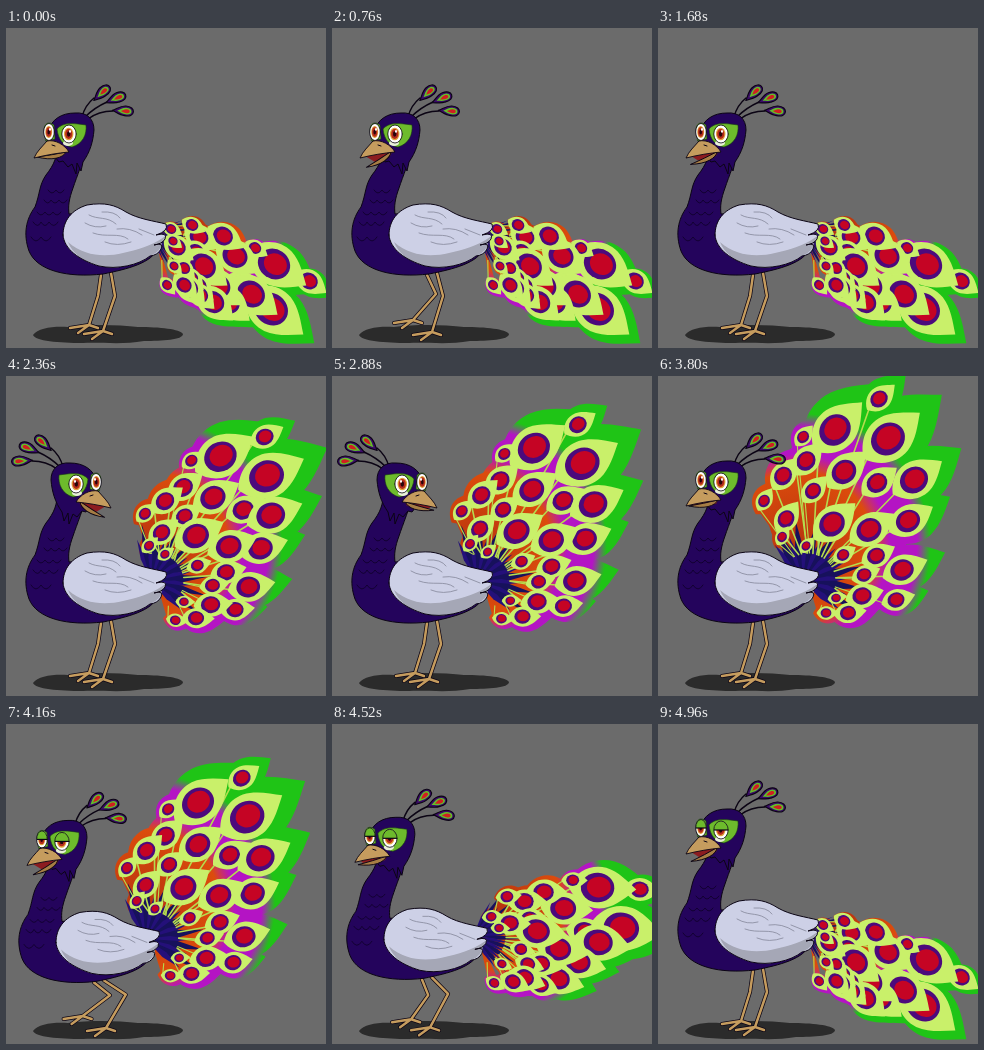
An HTML page with a canvas for the animation above (5 s loop, 320 by 320 pixels).

```html
<!DOCTYPE html>
<html lang="en">
<head>
<meta charset="utf-8">
<title>Peacock</title>
<style>
html, body { margin: 0; width: 100%; height: 100%; overflow: hidden; background: #6b6b6b; }
canvas { display: block; width: 320px; height: 320px; }
</style>
</head>
<body>
<canvas id="stage"></canvas>
<script>
const canvas = document.getElementById('stage');
const ctx = canvas.getContext('2d');
const dpr = window.devicePixelRatio || 1;
canvas.width = canvas.height = 320 * dpr;

const LOOP = 5000, STEP = 40, RAD = Math.PI / 180;
const INK = '#0b0414', PLUM = '#24045c', TAN = '#c59c5e', MASK = '#6dbb2c';
const PIVOT = [150, 205];

// Keys are time, value pairs, eased between neighbours
const motion = {
  fold: [0, 1, 1720, 1, 2600, 0, 2900, .12, 3240, 0, 3980, 0, 4920, 1, 5000, 1],
  lean: [0, 0, 280, .4, 580, 0, 3800, 0, 4260, 1, 4900, 0, 5000, 0],
  lift: [0, 0, 360, .2, 760, 1, 1120, 0, 3800, 0, 4160, 1, 4760, 0, 5000, 0],
  beak: [0, 0, 340, .7, 540, .25, 760, 1, 1200, .3, 1680, .7, 2000, .2, 2360, 1,
         2860, .3, 3360, 0, 3860, .1, 4160, 1, 4560, .3, 4960, .8, 5000, 0],
  lid:  [0, 0, 3900, 0, 4160, .5, 4960, .5, 5000, 0]
};

// Open x, y, eye radius, folded x, y
const feathers = [
  [221, 23, 8.5, 303, 253], [230, 63, 16.5, 265, 281], [177, 54, 15.5, 268, 236],
  [145, 61, 6, 249, 220], [219, 107, 10, 238, 258], [256, 104, 13.5, 245, 266],
  [186, 96, 12, 229, 228], [148, 85, 9.5, 217, 208], [250, 145, 11.5, 222, 274],
  [211, 154, 12, 212, 258], [125, 100, 9, 193, 209], [155, 115, 8, 190, 224],
  [174, 148, 12.5, 197, 238], [244, 194, 11, 207, 274], [106, 125, 6, 186, 197],
  [128, 143, 8.5, 171, 219], [218, 180, 8.5, 192, 258], [238, 224, 8, 194, 267],
  [206, 199, 7, 185, 250], [204, 220, 9, 183, 260], [185, 179, 6, 178, 240],
  [124, 161, 5, 165, 201], [190, 237, 7.5, 178, 257], [168, 237, 5, 161, 257],
  [148, 170, 4.5, 167, 213], [178, 222, 4.5, 168, 238]
];

const shape = d => new Path2D(d);
const leaf = shape('M-1.9 0C-1.4-1-.5-1.5.5-1.3C1.3-1.1 1.9-.5 2.5 0C1.9.5 1.3 1.1.5 1.3C-.5 1.5-1.4 1-1.9 0Z');
const body = shape('M83 112C77 134 71 148 67 160C63 171 62 178 63 186L104 184L152 220C146 235 122 241 97 246C62 250 31 243 23 223C17 206 20 191 29 179C34 166 33 157 40 147C48 137 52 128 51 115Z');
const wing = shape('M57 207C57 193 65 182 81 177C99 174 109 177 120 184C132 191 148 193 160 196Q163 203 150 207Q162 204 159 211Q156 216 148 217Q158 214 155 221Q152 227 144 228C133 237 111 242 93 238C73 232 58 221 57 207Z');
const wingShade = shape('M62 214C79 229 100 229 117 225C131 222 145 218 158 209Q161 207 156 214Q156 223 144 228C133 237 111 242 93 238C77 234 66 225 62 214Z');
const wingLines = shape('M83 187C92 192 101 188 110 196M96 184Q109 183 114 190M87 205C100 210 113 204 122 211M111 201Q124 199 136 207M79 195Q89 201 100 198M99 214Q111 219 125 214M133 201L148 207');
const scales = shape('M27 194q5 7 8 0q4 7 8 0q5 7 9 0M25 209q5 8 10 0q5 8 10 0M38 172q4 6 7 0q4 6 8 0q4 6 8 0M42 162q4 6 8 0q4 6 8 0M31 184q4 6 8 0q4 6 8 0q4 6 8 0');
const skull = shape('M42 104C45 91 56 85 69 85C81 84 88 91 88 102C87 114 84 124 77 134L75 143L71 135L70 146L66 136L62 139L57 133L53 134C47 127 42 116 42 104Z');
const mask = shape('M51 101C57 94 66 95 80 97C81 106 77 116 66 119C58 118 52 112 51 101ZM38 102C38 95 43 93 48 97L49 111L40 113Z');
const upperBeak = shape('M41 113C49 111 59 117 63 124C52 125 40 127 28 130C31 123 36 119 41 113Z');
const lowerBeak = shape('M31 129Q46 127 60 124C57 130 46 133 31 129Z');
const drop = shape('M-11 0C-6-2-2-6 4-6C10-6 13-3 13 0C13 4 9 6 3 5C-2 5-6 2-11 0Z');
const shadow = shape('M27 307C32 300 47 298 62 299C86 296 113 297 132 299C154 299 174 301 177 306C177 312 156 313 138 313C116 317 95 314 77 315C53 315 29 313 27 307Z');

const mix = (a, b, k) => a + (b - a) * k;

function at(keys, t) {
  let i = 0;
  while (i < keys.length - 4 && t >= keys[i + 2]) i += 2;
  const k = Math.min(1, Math.max(0, (t - keys[i]) / (keys[i + 2] - keys[i])));
  return mix(keys[i + 1], keys[i + 3], k * k * (3 - 2 * k));
}

function paint(path, fill, line, width = 1) {
  if (fill) { ctx.fillStyle = fill; ctx.fill(path); }
  if (line) { ctx.strokeStyle = line; ctx.lineWidth = width; ctx.stroke(path); }
}

function oval(x, y, rx, ry, fill, line, width) {
  const p = new Path2D();
  p.ellipse(x, y, rx, ry, 0, 0, 7);
  paint(p, fill, line, width);
}

function placed(x, y, turn, scale, draw) {
  ctx.save();
  ctx.translate(x, y);
  ctx.rotate(turn);
  ctx.scale(scale, scale);
  draw();
  ctx.restore();
}

function polygon(points, fill) {
  ctx.beginPath();
  points.forEach(p => ctx.lineTo(p[0], p[1]));
  ctx.fillStyle = fill;
  ctx.fill();
}

// Swings each feather around the tail root
function pose([ox, oy, r, cx, cy], q) {
  const [px, py] = PIVOT;
  const a0 = Math.atan2(oy - py, ox - px), a1 = Math.atan2(cy - py, cx - px);
  const d0 = Math.hypot(ox - px, oy - py), d1 = Math.hypot(cx - px, cy - py);
  const a = mix(a0, a1, q), d = mix(d0, d1, Math.sqrt(q));
  return {
    x: px + d * Math.cos(a), y: py + d * Math.sin(a), a, r,
    turn: mix(-20 * RAD + .32 * a0, 30 * RAD + .25 * a1, q)
  };
}

function plumeFill(q) {
  const a = q * 90 * RAD, c = Math.cos(a), s = Math.sin(a);
  const x = PIVOT[0] - 10 * c + 35 * s, y = PIVOT[1] - 35 * c - 10 * s;
  const g = ctx.createRadialGradient(x, y, 0, x, y, 170 * (1 - .28 * q));
  [[0, '#b8340f'], [.44, '#dc4c0c'], [.54, '#b414c4'], [.7, '#b414c4'], [.78, '#1fc416'], [1, '#1fc416']]
    .forEach(([k, color]) => g.addColorStop(k, color));
  return g;
}

function drawTail(q) {
  const all = feathers.map(f => pose(f, q));
  const fill = plumeFill(q), [px, py] = PIVOT;

  for (const f of all) {
    const w = f.r * mix(1.7, .6, q);
    const nx = -Math.sin(f.a) * w, ny = Math.cos(f.a) * w;
    polygon([[px, py], [f.x + nx, f.y + ny], [f.x - nx, f.y - ny]], fill);
    const grow = mix(1.55, 1.2, q), out = f.r * .35;
    const p = new Path2D();
    const m = new DOMMatrix()
      .translate(f.x + out * Math.cos(f.turn), f.y + out * Math.sin(f.turn))
      .rotate(f.turn / RAD).scale(f.r * grow);
    p.addPath(leaf, m);
    paint(p, fill);
  }

  for (let i = 0; i < 17; i++) {
    const a = mix(mix(-128, -22, q), mix(38, 66, q), i / 16) * RAD;
    const len = (i % 2 ? 60 : 46) * mix(1, .72, q), w = mix(.13, .05, q);
    const tip = (k, l) => [px - 5 + l * Math.cos(a + k), py + l * Math.sin(a + k)];
    polygon([[px - 5, py], tip(-w, len * .55), tip(0, len), tip(w, len * .55)], i % 2 ? '#17115c' : '#24107a');
  }

  ctx.strokeStyle = '#b5dc4e';
  for (const f of all) {
    ctx.lineWidth = f.r > 8 ? 1.6 : 1.1;
    ctx.beginPath();
    ctx.moveTo(px + 28 * Math.cos(f.a), py + 28 * Math.sin(f.a));
    ctx.lineTo(f.x - 1.5 * f.r * Math.cos(f.turn), f.y - 1.5 * f.r * Math.sin(f.turn));
    ctx.stroke();
  }

  for (const f of all) placed(f.x, f.y, f.turn, f.r, () => {
    paint(leaf, '#c9f06a');
    oval(0, 0, 1.08, .95, '#4c0a7c');
    oval(.08, -.04, .77, .67, '#c50424');
  });
}

function drawLeg(hip, knee, ankle) {
  const [x, y] = ankle;
  const p = new Path2D();
  p.moveTo(...hip);
  p.lineTo(...knee);
  p.lineTo(x, y);
  p.lineTo(x - 19, y + 3);
  p.moveTo(x, y);
  p.lineTo(x - 11, y + 8);
  p.moveTo(x, y);
  p.lineTo(x + 9, y + 3);
  paint(p, null, INK, 4);
  paint(p, null, TAN, 2.5);
}

function drawLegs(lean, lift) {
  const dx = -8 * lean, dy = 13 * lean;
  drawLeg([105 + dx, 245 + dy], [109 + 10 * lean + 2 * lift, 268 + 3 * lean], [97 + 3 * lift, 303 + lift]);
  drawLeg([95 + dx, 247 + dy], [92 + 12 * lift, 268 - 2 * lift + 6 * lean], [83 - 2 * lift - 5 * lean, 297 - 5 * lift]);
}

function drawEye(x, y, rx, ry, lid) {
  ctx.save();
  ctx.beginPath();
  ctx.ellipse(x, y, rx, ry, 0, 0, 7);
  ctx.clip();
  oval(x, y, rx, ry, '#fff');
  oval(x - .3, y, rx * .66, ry * .7, '#e2a33c');
  oval(x - .3, y, rx * .5, ry * .55, '#b52a1c');
  oval(x - .3, y, rx * .24, ry * .3, '#28040c');
  oval(x + 1, y - 2.6, 1, 1.3, '#fff');
  if (lid > 0) {
    const edge = y - ry + 2 * ry * lid;
    ctx.fillStyle = MASK;
    ctx.fillRect(x - rx, y - ry, 2 * rx, edge - y + ry);
    ctx.fillStyle = INK;
    ctx.fillRect(x - rx, edge - .6, 2 * rx, 1.2);
  }
  ctx.restore();
  oval(x, y, rx, ry, null, INK, .8);
}

function drawCrest() {
  const stalks = shape('M76 89C78 81 83 74 88 70M79 89C85 83 92 78 101 74M82 91C90 85 97 83 107 83');
  paint(stalks, null, INK, 1.5);
  [[95, 66, -42], [109, 71, -22], [116, 83, 4]].forEach(([x, y, turn]) =>
    placed(x, y, turn * RAD, .88, () => {
      paint(drop, '#3a0a68', INK, 1.3);
      ctx.translate(2, 0);
      ctx.scale(.68, .66);
      paint(drop, '#63bd2a');
      ctx.translate(2, 0);
      ctx.scale(.62, .6);
      paint(drop, '#d02020');
    }));
}

function drawHead(open, lid) {
  drawCrest();
  paint(skull, PLUM, INK);
  paint(mask, MASK, '#173c12', .6);
  oval(62, 115, 5, 3, '#e8f0d8');
  drawEye(43, 104, 5.3, 8.5, lid);
  drawEye(63, 106, 7.2, 9, lid);
  if (open > .05) polygon([[33, 128], [60, 124], [58, 128], [mix(33, 43, open), mix(129, 134, open)]], '#8c1c20');
  placed(58, 126, -.4 * open, 1, () => {
    ctx.translate(-58, -126);
    paint(lowerBeak, '#a67d44', INK, .9);
  });
  paint(upperBeak, TAN, INK, .9);
  paint(shape('M46 117l3 1'), null, INK, 1);
}

function draw(time) {
  const t = Math.floor((time % LOOP) / STEP) * STEP;
  const now = name => at(motion[name], t);
  const lean = now('lean');

  ctx.setTransform(dpr, 0, 0, dpr, 0, 0);
  ctx.lineJoin = ctx.lineCap = 'round';
  ctx.fillStyle = '#6b6b6b';
  ctx.fillRect(0, 0, 320, 320);
  paint(shadow, '#2b2b2b');

  ctx.save();
  ctx.translate(-6 * lean, 11 * lean);
  drawTail(now('fold'));
  ctx.restore();

  drawLegs(lean, now('lift'));

  ctx.translate(-8 * lean, 13 * lean);
  paint(body, PLUM, INK);
  paint(scales, null, '#11022e', .9);
  paint(wing, '#cdd0e6');
  paint(wingShade, '#a5a7b6');
  paint(wing, null, INK);
  paint(wingLines, null, '#85879a', .8);

  // The head looks back while the tail opens
  if (t >= 2000 && t < 3080) {
    ctx.translate(133, 2);
    ctx.scale(-1, 1);
  }
  drawHead(now('beak'), now('lid'));
}

function tick() {
  draw(performance.now());
  requestAnimationFrame(tick);
}
tick();
</script>
</body>
</html>
```
